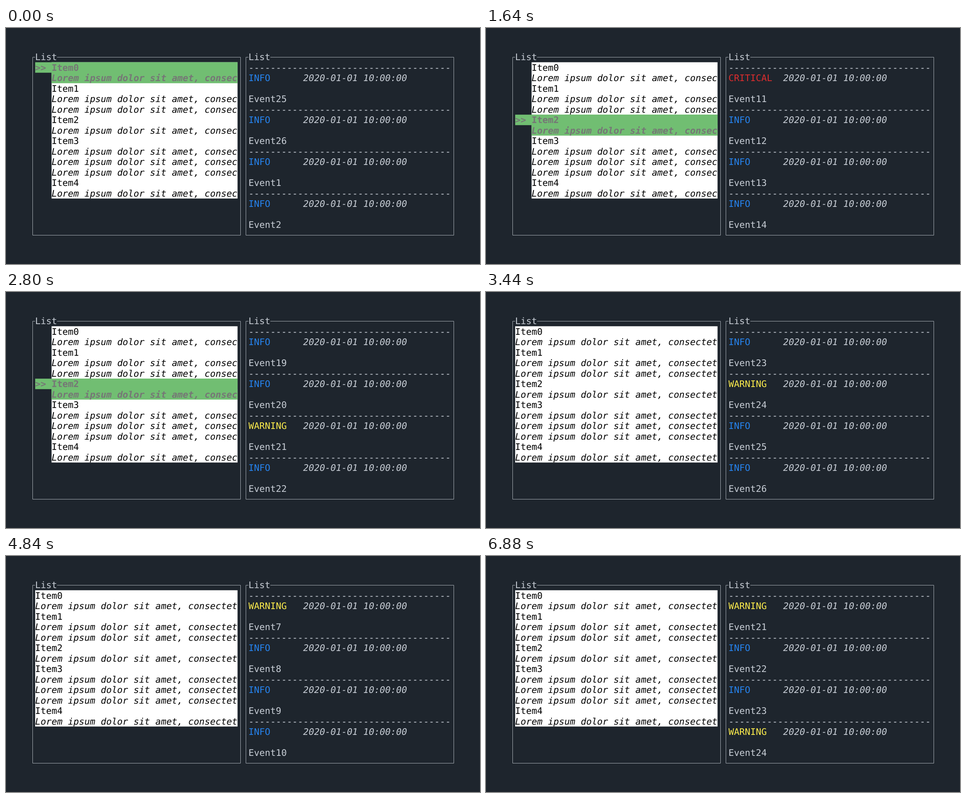
Write an HTML page that moves like this. It is 1058 by 529 pixels and loops after 6920 ms.

```html
<!DOCTYPE html>
<html lang="en">
<head>
<meta charset="utf-8">
<title>List demo</title>
<style>
  html, body { margin: 0; width: 100%; height: 100%; overflow: hidden; background: #1e252d; }
  svg { display: block; width: 1058px; height: 529px; }
  text { font: 20.28px "DejaVu Sans Mono", monospace; fill: #c8ced6; text-rendering: geometricPrecision; }
  path { fill: none; stroke: #a4abb2; stroke-width: 1; }
  .i { font-style: italic; }
  .dark { fill: #000; }
  .on { fill: #767676; font-weight: bold; }
  .white { fill: #fff; }
  .green { fill: #71be72; }
  .INFO { fill: #2684f0; }
  .WARNING { fill: #fcec4c; }
  .ERROR { fill: #7f0a9a; }
  .CRITICAL { fill: #de2d2e; }
</style>
</head>
<body>
<svg viewBox="0 0 1058 529">
  <g id="frame"></g>
  <g id="items"></g>
  <g id="log"></g>
</svg>
<script>
const LOOP = 6920, STEP = 40;
const COL = 12.208, ROW = 23.5, LEFT = 52.9, TOP = 65;
const LOREM = "Lorem ipsum dolor sit amet, consectetur";
const LINES = [1, 2, 1, 3, 1];
const EVENTS = 26, SHOWN = 4, FIRST = 24;
const LEVELS = { 3: "CRITICAL", 4: "ERROR", 7: "WARNING", 11: "CRITICAL",
                 17: "ERROR", 18: "ERROR", 21: "WARNING", 24: "WARNING" };

// [time, scrolled events], linear in between
const SCROLL = [[0, 0], [120, 1], [640, 5], [880, 5], [920, 7], [1640, 12], [3360, 24],
                [4400, 31], [4840, 34], [5000, 35], [5520, 39], [6720, 47], [6880, 48], [6920, 48]];
// [time, selected item], -1 for none
const SELECT = [[0, 0], [760, 1], [1160, 2], [1680, 3], [2240, 2], [2840, 1], [3440, -1]];

const $ = id => document.getElementById(id);
const x = col => LEFT + col * COL;
const text = (col, row, str, cls = "") =>
  `<text x="${x(col)}" y="${TOP + row * ROW + 7.2}" class="${cls}">${str}</text>`;
const fill = (col, row, end, rows, cls) =>
  `<rect x="${x(col)}" y="${TOP + (row - .5) * ROW}" width="${x(end) - x(col)}" height="${rows * ROW}" class="${cls}"/>`;

function panel(col) {
  const l = Math.round(x(col)) + 6.5, r = l + 464;
  return `<path d="M${x(col + 1)} 65.5H${l}V464.5H${r}V65.5H${x(col + 5)}"/>` + text(col + 1, 0, "List");
}

function drawItems(selected) {
  const col = selected < 0 ? 1 : 4;
  const lorem = LOREM.slice(0, 38 - col);
  let out = fill(col, 1, 38, 13, "white"), row = 1;
  LINES.forEach((n, i) => {
    const on = i === selected, cls = on ? "on" : "dark";
    if (on) {
      out += fill(1, row, 38, 1, "green") + fill(col, row, 38, n + 1, "green");
      out += text(1, row, "&gt;&gt;", "on");
    }
    out += text(col, row++, "Item" + i, cls);
    for (let k = 0; k < n; k++) out += text(col, row++, lorem, cls + " i");
  });
  $("items").innerHTML = out;
}

function drawLog(scrolled) {
  let out = "";
  for (let i = 0; i < SHOWN; i++) {
    const id = (FIRST + scrolled + i) % EVENTS + 1;
    const level = LEVELS[id] || "INFO", row = 1 + i * 4;
    out += text(40, row, "-".repeat(37));
    out += text(40, row + 1, level, level);
    out += text(50, row + 1, "2020-01-01 10:00:00", "i").replace(" 10:", "&#160;10:");
    out += text(40, row + 3, "Event" + id);
  }
  $("log").innerHTML = out;
}

function scrolledAt(t) {
  const k = SCROLL.findIndex(p => p[0] > t);
  const [t0, n0] = SCROLL[k - 1], [t1, n1] = SCROLL[k];
  return Math.floor(n0 + (n1 - n0) * (t - t0) / (t1 - t0) + 1e-6);
}

const selectedAt = t => SELECT.filter(p => p[0] <= t).pop()[1];

let shownItem, shownScroll;
function draw(now) {
  const t = Math.floor(now % LOOP / STEP) * STEP;
  const item = selectedAt(t), scrolled = scrolledAt(t);
  if (item !== shownItem) drawItems(shownItem = item);
  if (scrolled !== shownScroll) drawLog(shownScroll = scrolled);
}

$("frame").innerHTML = panel(0) + panel(39);
draw(0);
let start;
requestAnimationFrame(function loop(now) {
  start ??= now;
  draw(Math.max(0, now - start));
  requestAnimationFrame(loop);
});
</script>
</body>
</html>
```
